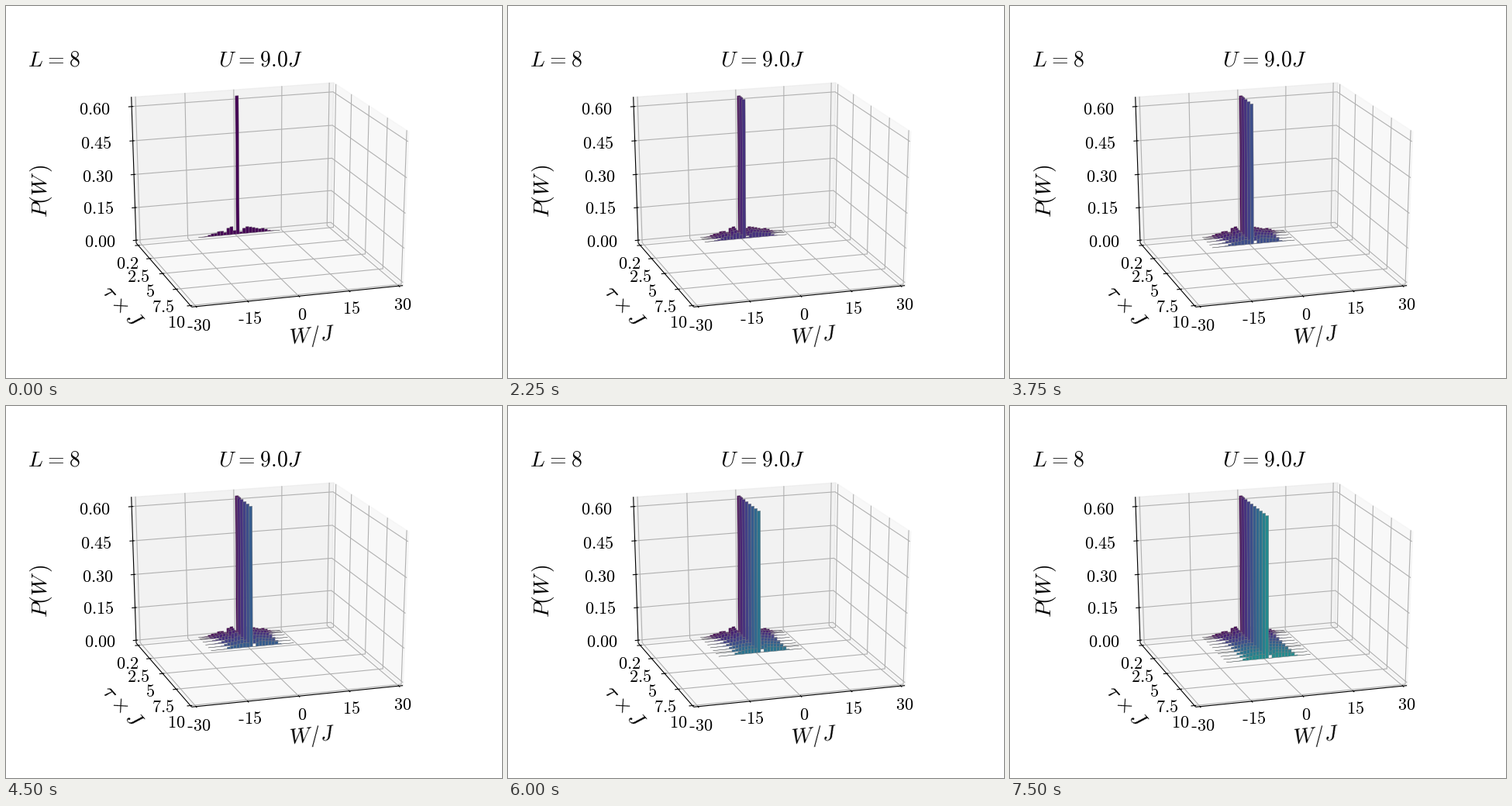
These frames come from a looping animation (640 px wide and 480 px high, 8 s). A matplotlib script:

```python
import numpy as np
import matplotlib.pyplot as plt
from matplotlib.animation import FuncAnimation
from matplotlib.collections import LineCollection, PolyCollection

plt.rcParams["mathtext.fontset"] = "cm"

W, H, DPI = 640, 480, 100
PX = 72 / DPI  # points per pixel
ZMAX = 0.629
ELEV, TURN = np.radians(21.5), np.radians(17.5)
DIST = 10

fig = plt.figure(figsize=(W / DPI, H / DPI), dpi=DPI, facecolor="white")
ax = fig.add_axes([0, 0, 1, 1])
ax.set(xlim=(0, W), ylim=(H, 0))
ax.axis("off")


def proj(x, y, z):
    """Perspective view of a point in the unit box, in pixels."""
    side = x * np.cos(TURN) + y * np.sin(TURN)
    near = y * np.cos(TURN) - x * np.sin(TURN)
    up = z * np.cos(ELEV) - near * np.sin(ELEV)
    depth = DIST - near * np.cos(ELEV) - z * np.sin(ELEV)
    return 334.7 + 2681 * side / depth, 237.4 - 1998 * up / depth


def bx(work):
    return work / 60


def by(tau):
    return tau / 10 - 0.5


def bz(prob):
    return prob / ZMAX - 0.5


def path(*points):
    return [proj(*p) for p in points]


# Box with its margins: panes, grid, axis lines and ticks
E = 0.5 + 1 / 48
OUT, IN = 0.0167, 0.0083
X_TICKS = [-30, -15, 0, 15, 30]
Y_TICKS = [0.2, 2.5, 5, 7.5, 10]
Z_TICKS = [0, 0.15, 0.3, 0.45, 0.6]

panes = [
    path((E, -E, -E), (E, E, -E), (E, E, E), (E, -E, E)),
    path((-E, -E, -E), (E, -E, -E), (E, -E, E), (-E, -E, E)),
    path((-E, -E, -E), (E, -E, -E), (E, E, -E), (-E, E, -E)),
]
for quad, grey in zip(panes, (0.95, 0.90, 0.95)):
    tone = (grey, grey, grey, 0.5)
    ax.add_collection(PolyCollection([quad], facecolors=[tone],
                                     edgecolors=[tone], linewidths=1, zorder=1))

grid, ticks = [], []
for v in map(bx, X_TICKS):
    grid.append(path((v, E, -E), (v, -E, -E), (v, -E, E)))
    ticks.append(path((v, E - IN, -E), (v, E + OUT, -E)))
for v in map(by, Y_TICKS):
    grid.append(path((-E, v, -E), (E, v, -E), (E, v, E)))
    ticks.append(path((-E - OUT, v, -E), (-E + IN, v, -E)))
for v in map(bz, Z_TICKS):
    grid.append(path((-E, -E, v), (E, -E, v), (E, E, v)))
    ticks.append(path((-E - OUT, -E, v), (-E + IN, -E, v)))

spines = [
    path((-E, E, -E), (E, E, -E)),
    path((-E, -E, -E), (-E, E, -E)),
    path((-E, -E, -E), (-E, -E, E)),
]
ax.add_collection(LineCollection(grid, colors="#b0b0b0", linewidths=0.8, zorder=2))
ax.add_collection(LineCollection(spines + ticks, colors="black",
                                 linewidths=0.8, zorder=3))


# Lettering
def label(x, y, s, size=16, **kw):
    ax.text(x, y, f"${s}$", size=size, ha="center",
            **{"va": "baseline", "zorder": 20, **kw})


def tick_label(x, y, s):
    """Number centred on (x, y); a leading sign is a short hyphen."""
    if s.startswith("-"):
        left = x - 14.6
        ax.plot([left, left + 5.9], [y + 2.3] * 2, color="black", lw=1.4 * PX,
                solid_capstyle="butt", zorder=20)
        x, s = x + 3.7, s[1:]
    label(x, y + 7, s)


tick_labels = [
    (114.5, 133, "0.60"), (116, 177, "0.45"), (118.5, 220, "0.30"),
    (119.5, 261, "0.15"), (121.5, 304, "0.00"),
    (157, 332, "0.2"), (171, 349, "2.5"), (186, 368, "5"),
    (203, 388, "7.5"), (220, 408, "10"),
    (249, 412, "-30"), (314.5, 403, "-15"), (382.5, 398, "0"),
    (446, 390, "15"), (512, 385, "30"),
]
for item in tick_labels:
    tick_label(*item)

EQ = r"\hspace{0.07}=\hspace{0.07}"
label(62, 77, f"L{EQ}8", 20)
label(328.5, 78, f"U{EQ}9.0J", 20)
label(45, 238.5, r"P(W\hspace{0.13})", 20, va="center", rotation=90)
label(395, 427, "W/J", 20, va="center", rotation=5.7)
label(151, 387, r"\tau\hspace{0.05}\times\hspace{0.05}J", 20,
      va="center", rotation=-48.3)

# Work distribution: side weights in thousandths for short and long times
N = np.arange(-12, 14)
SHORT = np.array([0.5, 1.5, 3, 7, 12, 13, 20, 20, 13, 32, 37, 18, 0,
                  10, 25, 31, 28, 24, 20, 16, 17, 11, 5, 2, 1, 0.5])
LONG = np.array([0.2, 0.4, 0.6, 0.9, 1.5, 9, 13, 16, 19, 20, 21, 20, 0,
                 1, 18, 24, 23, 21, 20, 18, 15, 4, 1, 0.6, 0.4, 0.2])
PEAK = 0.625
TAUS = np.concatenate([[0.2, 0.4, 0.6], np.arange(1, 10.1, 0.5)])
SHOWN = 11


def weights(k):
    mix = min(1, k / 6)
    p = ((1 - mix) * SHORT + mix * LONG) / 1000
    p[N == 0] = PEAK
    return p


def bar(n, y, p):
    a, b, lo, hi = bx(n - 0.5), bx(n + 0.5), bz(0), bz(p)
    return path((a, y, lo), (b, y, lo), (b, y, hi), (a, y, hi))


rows = []
for k in range(SHOWN):
    y = by(TAUS[k] + 0.12)
    color = plt.cm.viridis(k / (len(TAUS) - 1))
    row = PolyCollection([bar(n, y, p) for n, p in zip(N, weights(k))],
                         facecolors=[color], edgecolors="0.5",
                         linewidths=0.3, zorder=5 + k)
    rows.append(ax.add_collection(row))

STEP, HOLD = 250, 3  # ms per frame, frames per new row
FRAMES = 32


def update(i):
    last = min(i // HOLD, SHOWN - 1)
    for k, row in enumerate(rows):
        row.set_visible(k <= last)
    return rows


anim = FuncAnimation(fig, update, frames=FRAMES, interval=STEP,
                     init_func=lambda: update(0), repeat=True,
                     repeat_delay=0, blit=False)
plt.show()
```
